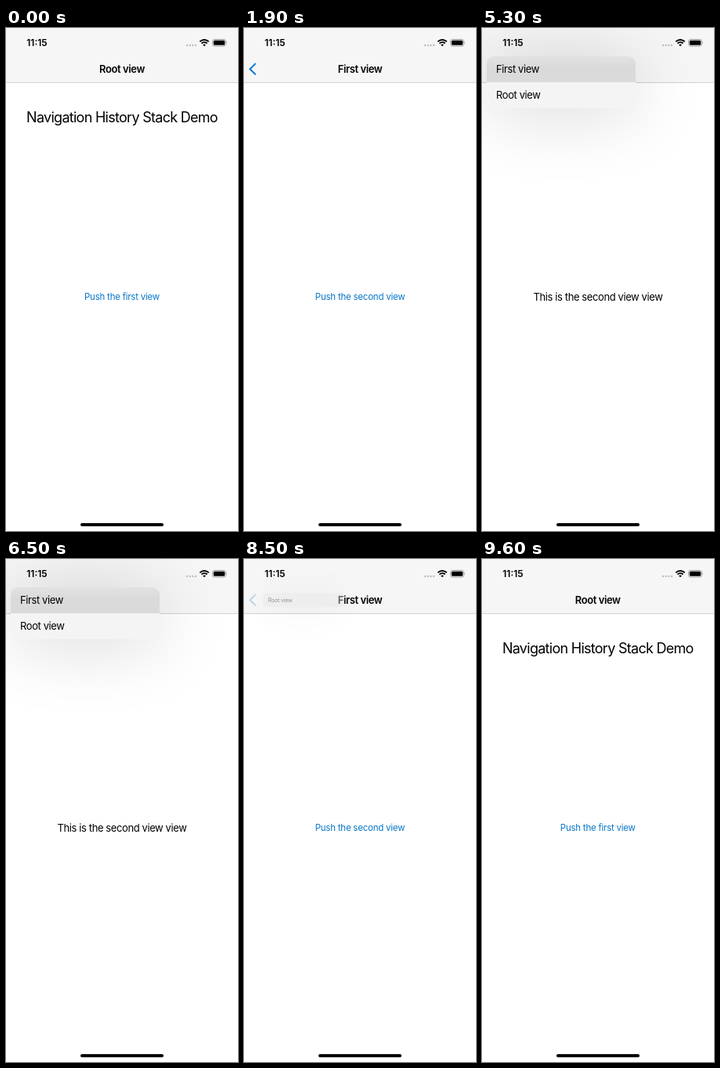
Write an HTML page that moves like this. It is 296 px wide and 640 px high and loops after 9700 ms.

```html
<!DOCTYPE html>
<html lang="en">
<head>
<meta charset="utf-8">
<title>Navigation history</title>
<style>
  html, body { margin: 0; width: 100%; height: 100%; overflow: hidden; background: #fff; }
  body { position: relative; font: 13px/20px Inter, "Open Sans", sans-serif; letter-spacing: -.031em; color: #000; white-space: nowrap; }
  .stage { position: absolute; left: 0; top: 0; width: 296px; height: 640px; overflow: hidden; background: #fff; }
  .page, .page::after { position: absolute; left: 0; top: 0; width: 296px; height: 640px; }
  .page { background: #fff; text-align: center; }
  .page::after { content: ""; background: #000; opacity: var(--dim, 0); }
  .page > * { position: absolute; left: 0; width: 100%; }
  .heading { top: 104px; font-size: 18px; letter-spacing: -.04em; }
  .link { top: 332px; font-size: 11.5px; letter-spacing: -.02em; color: #0a78c8; }
  .label { top: 332px; }
  .bar { position: absolute; left: 0; top: 0; width: 296px; height: 69px; background: #f6f6f6; border-bottom: 1px solid #d2d2d2; }
  .title { position: absolute; left: 0; top: 42px; width: 100%; text-align: center; font-weight: 600; }
  svg { position: absolute; left: 0; top: 0; }
  .menu { position: absolute; left: 6px; top: 36px; width: 190px; border-radius: 9px; transform-origin: 40px 16px;
          background: #e3e3e3; box-shadow: 0 4px 90px rgba(0, 0, 0, .17); }
  .menu.two { background: linear-gradient(#e2e2e2, #dadada 14px, #dadada 33px, #f4f4f4 33px); }
  .row { height: 33px; line-height: 33px; padding-left: 12px; border-radius: 9px; }
  .two .row:first-child { border-radius: 9px 9px 0 0; }
  .time { position: absolute; left: 14px; top: 9px; width: 51px; text-align: center; font-size: 12px; font-weight: 600; letter-spacing: 0; }
  .home { position: absolute; left: 95px; top: 630px; width: 106px; height: 4px; border-radius: 2px; background: #000; }
</style>
</head>
<body>
<div class="stage">
  <div class="page">
    <div class="heading">Navigation History Stack Demo</div>
    <div class="link">Push the first view</div>
  </div>
  <div class="page"><div class="link">Push the second view</div></div>
  <div class="page"><div class="label">This is the second view view</div></div>

  <div class="bar">
    <div class="title">Root view</div>
    <div class="title">First view</div>
    <div class="title">Second view</div>
    <svg width="296" height="69">
      <path id="back" d="M14.3 45.6 7.6 52.2 14.3 58.8" fill="none" stroke="#0a78d0" stroke-width="2" stroke-linecap="round" stroke-linejoin="round"/>
    </svg>
  </div>

  <div class="menu two" id="menuTwo"><div class="row">First view</div><div class="row">Root view</div></div>
  <div class="menu" id="menuOne"><div class="row">Root view</div></div>

  <div class="time">11:15</div>
  <svg width="296" height="30">
    <g fill="#bcbcbc">
      <circle cx="231" cy="22" r="1.2"/><circle cx="234.7" cy="22" r="1.2"/>
      <circle cx="238.3" cy="22" r="1.2"/><circle cx="242" cy="22" r="1.2"/>
    </g>
    <g fill="none" stroke="#000" stroke-width="1.8">
      <path d="M247.3 17.4a8 8 0 0 1 11.4 0"/>
      <path d="M249.4 19.7a5 5 0 0 1 7.2 0"/>
    </g>
    <path d="M251.2 21.4a2.6 2.6 0 0 1 3.6 0L253 23.3z"/>
    <rect x="263.5" y="14.5" width="17" height="8.6" rx="2.6" fill="none" stroke="#a0a0a0"/>
    <rect x="264.8" y="15.8" width="14.4" height="6" rx="1.5"/>
    <path d="M281.6 17.3q1.4 1.5 0 3z" fill="#a0a0a0"/>
  </svg>
  <div class="home"></div>
</div>

<script>
  const LOOP = 9700, STEP = 100, WIDTH = 296;
  const pages = [...document.querySelectorAll('.page')];
  const titles = [...document.querySelectorAll('.title')];
  const links = [...document.querySelectorAll('.link')];
  const back = document.getElementById('back');
  const menuTwo = document.getElementById('menuTwo');
  const menuOne = document.getElementById('menuOne');
  const clamp = (v, lo, hi) => Math.min(hi, Math.max(lo, v));

  // Critically damped spring from 0 to 1
  function spring(ms) {
    if (ms < 0) return 0;
    if (ms > 500) return 1;
    const x = 0.019 * (ms + 31);
    return 1 - (1 + x) * Math.exp(-x);
  }

  function drawMenu(el, t, open, close) {
    const shown = t >= open && t < close + 300;
    el.style.visibility = shown ? 'visible' : 'hidden';
    if (!shown) return;
    let scale = 1, opacity = 1;
    const s = (t - open + 50) / 1000;
    if (t >= close) {
      const p = spring(t - close);
      scale = 1 - 0.62 * p;
      opacity = Math.max(0, 1 - 1.15 * p);
    } else if (t < open + 400) {
      scale = 1 - Math.exp(-12 * s) * Math.cos(12 * s);
      opacity = Math.min(1, 8 * s);
    }
    el.style.transform = `scale(${scale})`;
    el.style.opacity = opacity;
  }

  // A tapped link dims, then recovers while its page slides away
  function drawLink(el, t, tap) {
    el.style.opacity = t < tap ? 1 : 0.2 + 0.8 * spring(t - tap - STEP);
  }

  function render(t) {
    const depth = spring(t - 1400) + spring(t - 2900) - spring(t - 6900) - spring(t - 9200);

    pages.forEach((page, k) => {
      const d = clamp(k - depth, -1, 1);
      page.style.transform = `translateX(${d * (d > 0 ? WIDTH : WIDTH * 0.3)}px)`;
      page.style.setProperty('--dim', 0.1 * Math.max(0, -d));
      titles[k].style.transform = `translateX(${d * 118}px)`;
      titles[k].style.opacity = 1 - Math.abs(d);
    });

    drawLink(links[0], t, 1300);
    drawLink(links[1], t, 2800);

    const held = (t >= 4100 && t < 6900) || t >= 7800;
    const press = held ? 0.25 : t >= 6900 ? 0.25 + 0.75 * spring(t - 6900) : 1;
    back.style.opacity = press * clamp(depth, 0, 1);

    drawMenu(menuTwo, t, 4900, 6900);
    drawMenu(menuOne, t, 8500, 9200);
    menuTwo.firstElementChild.style.background = t >= 6200 && t < 6500 ? 'rgba(0,0,0,.07)' : 'none';
  }

  const start = performance.now();
  function tick() {
    const t = (performance.now() - start) % LOOP;
    render(Math.floor(t / STEP) * STEP);
    requestAnimationFrame(tick);
  }
  tick();
</script>
</body>
</html>
```
